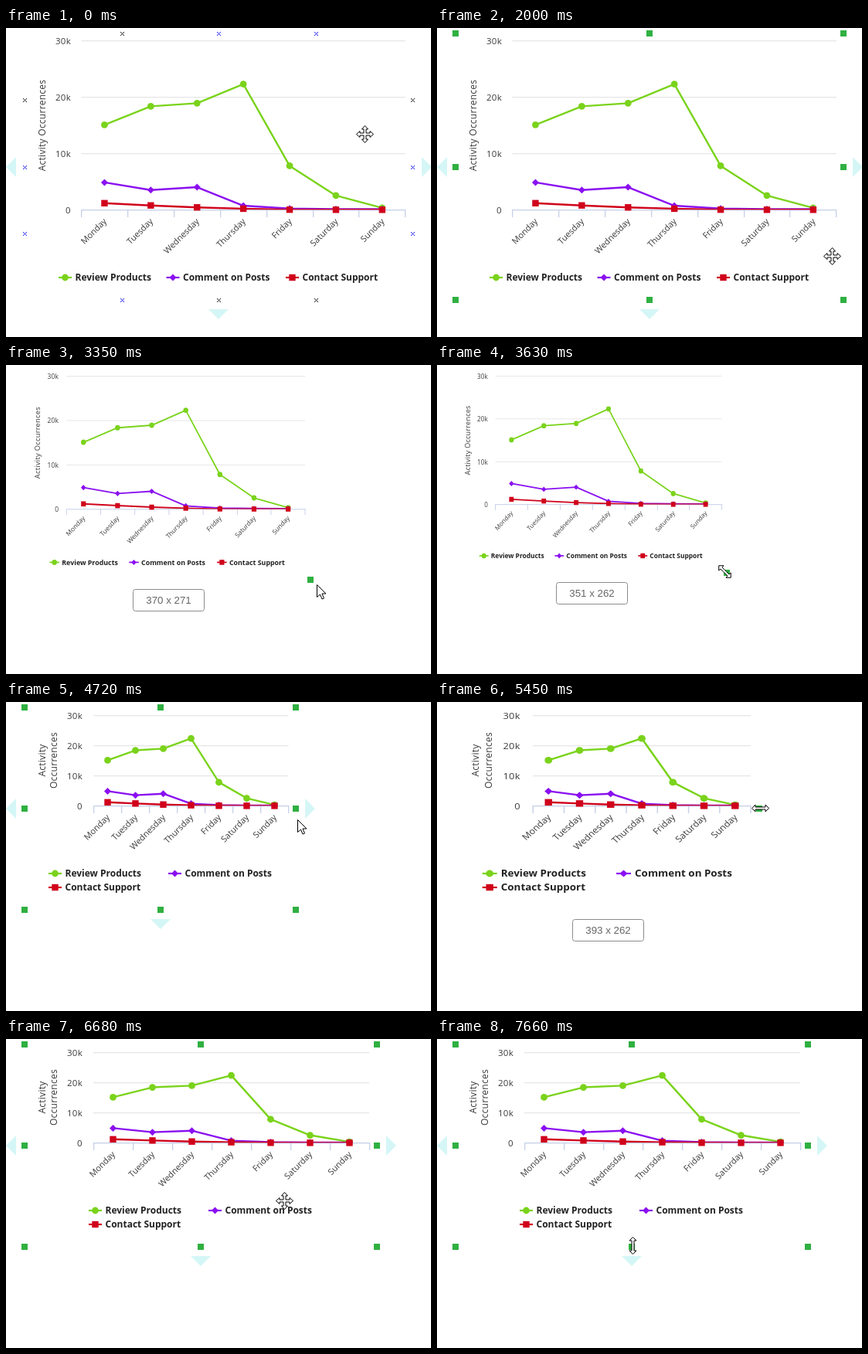
These frames come from a looping animation (550 by 400 pixels, 8 s). An HTML page with a canvas:

```html
<!DOCTYPE html>
<html lang="en">
<head>
<meta charset="utf-8">
<title>Resizing a chart</title>
<style>
  html, body { margin: 0; width: 550px; height: 400px; overflow: hidden; background: #fff; }
  canvas { display: block; }
</style>
</head>
<body>
<canvas id="stage" width="550" height="400"></canvas>
<script>
const ctx = document.getElementById('stage').getContext('2d');
const LOOP = 8000, TICK = 70;
const LEFT = 24, TOP = 7;               // top left corner of the widget
const FONT = '"Open Sans", "Noto Sans", sans-serif';
const INK = '#3a3a3a';

const days = ['Monday', 'Tuesday', 'Wednesday', 'Thursday', 'Friday', 'Saturday', 'Sunday'];
const series = [
  { name: 'Review Products', color: '#7ad31b', mark: 'circle', data: [15.15, 18.45, 19, 22.4, 7.85, 2.55, 0.35] },
  { name: 'Comment on Posts', color: '#8a10f0', mark: 'diamond', data: [4.9, 3.55, 4.05, 0.75, 0.25, 0.15, 0.13] },
  { name: 'Contact Support', color: '#d0021b', mark: 'square', data: [1.2, 0.8, 0.45, 0.22, 0.05, 0.03, 0.03] }
];

// Chart layouts: plot left, column width, zero line, height of 10k, legend places
const large = {
  w: 502, h: 345, x: 97.5, col: 59.9, zero: 235, unit: 72.7, labelX: 84,
  title: ['Activity Occurrences'], titleY: 126,
  legend: [[68, 323], [207.5, 323], [362, 323]]
};
const compact = (w, x, col, legendX) => ({
  w, h: 262, x, col, zero: 134, unit: 39, labelX: 99,
  title: ['Activity', 'Occurrences'], titleY: 75.5,
  legend: [[legendX, 222], [legendX + 155, 222], [legendX, 240]]
});
const small = compact(351, 113.5, 36, 55);
const medium = compact(456, 113, 51, 107);

// Pointer moves: start, steps, x, y, sharpness of the easing
const moves = [
  [1370, 12, 517, 315, 1.28], [2210, 6, 526, 352, 1.1], [2860, 12, 372, 267, 2.05],
  [4160, 10, 377, 141, 1.07], [4940, 1, 377, 139, 1], [5240, 9, 483, 134, 2.1],
  [6260, 12, 285, 254, 1.5], [7100, 9, 253, 267, 1.2]
];

const progress = (t, start, steps) =>
  Math.min(1, Math.max(0, (Math.floor((t - start) / TICK) + 1) / steps));
const ease = (p, a) => p ** a / (p ** a + (1 - p) ** a);
const mix = (a, b, k) => a + (b - a) * k;

function text(str, x, y, font, color, align = 'left', angle = 0, spacing = 0) {
  ctx.save();
  ctx.translate(x, y);
  ctx.rotate(angle);
  ctx.font = font;
  ctx.letterSpacing = spacing + 'px';
  ctx.textAlign = align;
  ctx.fillStyle = color;
  ctx.fillText(str, 0, 0);
  ctx.restore();
}

function rect(x, y, w, h, color) {
  ctx.fillStyle = color;
  ctx.fillRect(x, y, w, h);
}

function polygon(points, fill, stroke) {
  ctx.beginPath();
  points.forEach(([x, y]) => ctx.lineTo(x, y));
  ctx.closePath();
  ctx.fillStyle = fill;
  ctx.fill();
  if (stroke) {
    ctx.strokeStyle = stroke;
    ctx.lineWidth = 1;
    ctx.stroke();
  }
}

function line(points, color, width) {
  ctx.beginPath();
  points.forEach(([x, y]) => ctx.lineTo(x, y));
  ctx.strokeStyle = color;
  ctx.lineWidth = width;
  ctx.lineJoin = 'round';
  ctx.stroke();
}

function marker(kind, x, y, color) {
  if (kind === 'square') return rect(x - 4.2, y - 4.2, 8.4, 8.4, color);
  if (kind === 'diamond') return polygon([[x, y - 4.5], [x + 4.5, y], [x, y + 4.5], [x - 4.5, y]], color);
  ctx.beginPath();
  ctx.arc(x, y, 4.4, 0, 7);
  ctx.fillStyle = color;
  ctx.fill();
}

function drawChart(c) {
  const width = c.col * 7, axis = '#c6d0e8';
  for (let i = 0; i < 4; i++) {
    const y = Math.floor(c.zero - i * c.unit);
    if (i) rect(c.x, y, width, 1.3, '#e6e6e6');
    text(i ? i + '0k' : '0', c.labelX, y + 5, '11.5px ' + FONT, INK, 'right', 0, 0.3);
  }
  c.title.forEach((str, i) =>
    text(str, 51 + i * 15, c.titleY, '12px ' + FONT, INK, 'center', -Math.PI / 2, 0.28));

  rect(c.x, c.zero, width, 1.3, axis);
  for (let i = 0; i <= 7; i++) rect(Math.round(c.x + i * c.col - 0.5), c.zero, 1.3, 10, axis);
  days.forEach((day, i) =>
    text(day, c.x + (i + 0.5) * c.col + 3.5, c.zero + 16, '11px ' + FONT, INK, 'right', -Math.PI / 4));

  series.forEach((s, n) => {
    const points = s.data.map((v, i) => [c.x + (i + 0.5) * c.col, c.zero + 0.5 - v * c.unit / 10]);
    ctx.save();
    ctx.beginPath();
    ctx.rect(c.x, 0, width, c.zero + 0.3);
    ctx.clip();
    line(points, s.color, 2.4);
    ctx.restore();
    points.forEach(([x, y]) => marker(s.mark, x, y, s.color));

    const [x, y] = c.legend[n];
    line([[x, y], [x + 17, y]], s.color, 2.2);
    marker(s.mark, x + 8.5, y, s.color);
    text(s.name, x + 21.5, y + 4, 'bold 12px ' + FONT, '#222');
  });
}

function drawCrosses() {
  const cross = (x, y, dark) => {
    const color = dark ? '#222' : '#2222ee';
    line([[x - 2, y - 2], [x + 3, y + 3]], color, 1);
    line([[x + 3, y - 2], [x - 2, y + 3]], color, 1);
  };
  [150, 275, 401].forEach((x, i) => {
    cross(x, 7, i === 0);
    cross(x, 352, i > 0);
  });
  [93, 180, 266].forEach((y, i) => {
    cross(24, y, i === 0);
    cross(526, y, i === 0);
  });
}

function drawArrows(right, bottom, midX, midY) {
  const color = '#d5f6f6', a = 12, b = 25, r = 13;
  polygon([[LEFT - a + 1, midY - r], [LEFT - a + 1, midY + r], [LEFT - b + 1, midY]], color);
  polygon([[right + a, midY - r], [right + a, midY + r], [right + b, midY]], color);
  polygon([[midX - r, bottom + a], [midX + r, bottom + a], [midX, bottom + b]], color);
}

function drawSize(w, h) {
  const x = Math.round(LEFT + w / 2 - 45.4), y = Math.round(TOP + h + 12);
  ctx.beginPath();
  ctx.roundRect(x + 0.5, y + 0.5, 92, 28, 3);
  ctx.fillStyle = '#fff';
  ctx.fill();
  ctx.strokeStyle = '#8c8c8c';
  ctx.lineWidth = 1;
  ctx.stroke();
  text(`${Math.round(w)} x ${Math.round(h)}`, x + 46.5, y + 19, '13.3px "Liberation Sans", Arial, sans-serif', '#666', 'center');
}

// Two-way or four-way arrow around the pointer's place
function drawArms(x, y, count, angle) {
  const head = count === 4 ? 4 : 4.5, points = [];
  for (let i = 0; i < count; i++) {
    const a = angle + i * 2 * Math.PI / count, cos = Math.cos(a), sin = Math.sin(a);
    [[1.5, -1.5], [6.5, -1.5], [6.5, -head], [11, 0], [6.5, head], [6.5, 1.5], [1.5, 1.5]]
      .forEach(([u, v]) => points.push([x + 0.5 + u * cos - v * sin, y + 0.5 + u * sin + v * cos]));
  }
  polygon(points, '#fff', '#000');
}

function drawPointer(t, right, bottom, handles) {
  let x = 464, y = 137;
  for (const [start, steps, toX, toY, a] of moves) {
    const k = ease(progress(t, start, steps), a);
    x = mix(x, toX, k);
    y = mix(y, toY, k);
  }
  x = Math.round(x);
  y = Math.round(y);
  const hit = handles.find(([hx, hy]) => Math.abs(x - hx) <= 5 && y - hy < 3 && y - hy > -5);
  if (hit) drawArms(x, y, 2, hit[2]);
  else if (x <= right && y <= bottom) drawArms(x, y, 4, 0);
  else polygon([[0, 0], [0, 16], [4, 12.5], [6.5, 18.5], [9, 17.5], [6.5, 11.5], [11.5, 11.5]]
    .map(([u, v]) => [x + 0.5 + u, y + 0.5 + v]), '#fff', '#000');
}

function draw(t) {
  const firstDrag = t >= 2860 && t < 3700, secondDrag = t >= 5240 && t < 5800;
  const dragging = firstDrag || secondDrag;
  const layout = t < 3700 ? large : t < 5800 ? small : medium;
  let { w, h } = layout;
  if (firstDrag) {
    const p = progress(t, 2860, 12);
    w = mix(large.w, small.w, ease(p, 2.8));
    h = mix(large.h, small.h, ease(p, 3));
  }
  if (secondDrag) w = mix(small.w, medium.w, ease(progress(t, 5240, 9), 1.9));

  const right = Math.round(LEFT + w), bottom = Math.round(TOP + h);
  const midX = Math.round(LEFT + w / 2), midY = Math.round(TOP + h / 2);
  const corner = [right, bottom, Math.PI / 4], side = [right, midY, 0];
  const handles = firstDrag ? [corner] : secondDrag ? [side] : [
    corner, side, [midX, bottom, Math.PI / 2],
    [LEFT, TOP, Math.PI / 4], [midX, TOP, Math.PI / 2], [right, TOP, -Math.PI / 4],
    [LEFT, midY, 0], [LEFT, bottom, -Math.PI / 4]
  ];

  rect(0, 0, 550, 400, '#fff');
  ctx.save();
  ctx.translate(LEFT, TOP);
  ctx.scale(w / layout.w, h / layout.h);
  ctx.translate(-LEFT, -TOP);
  drawChart(layout);
  ctx.restore();

  if (t < 610) drawCrosses();
  else handles.forEach(([x, y]) => rect(x - 4, y - 4, 8, 8, '#2fb041'));
  if (dragging) drawSize(w, h);
  else if (t < 610 || t >= 910) drawArrows(right, bottom, midX, midY);
  drawPointer(t, right, bottom, handles);
}

function frame() {
  draw(performance.now() % LOOP);
  requestAnimationFrame(frame);
}
frame();
</script>
</body>
</html>
```
